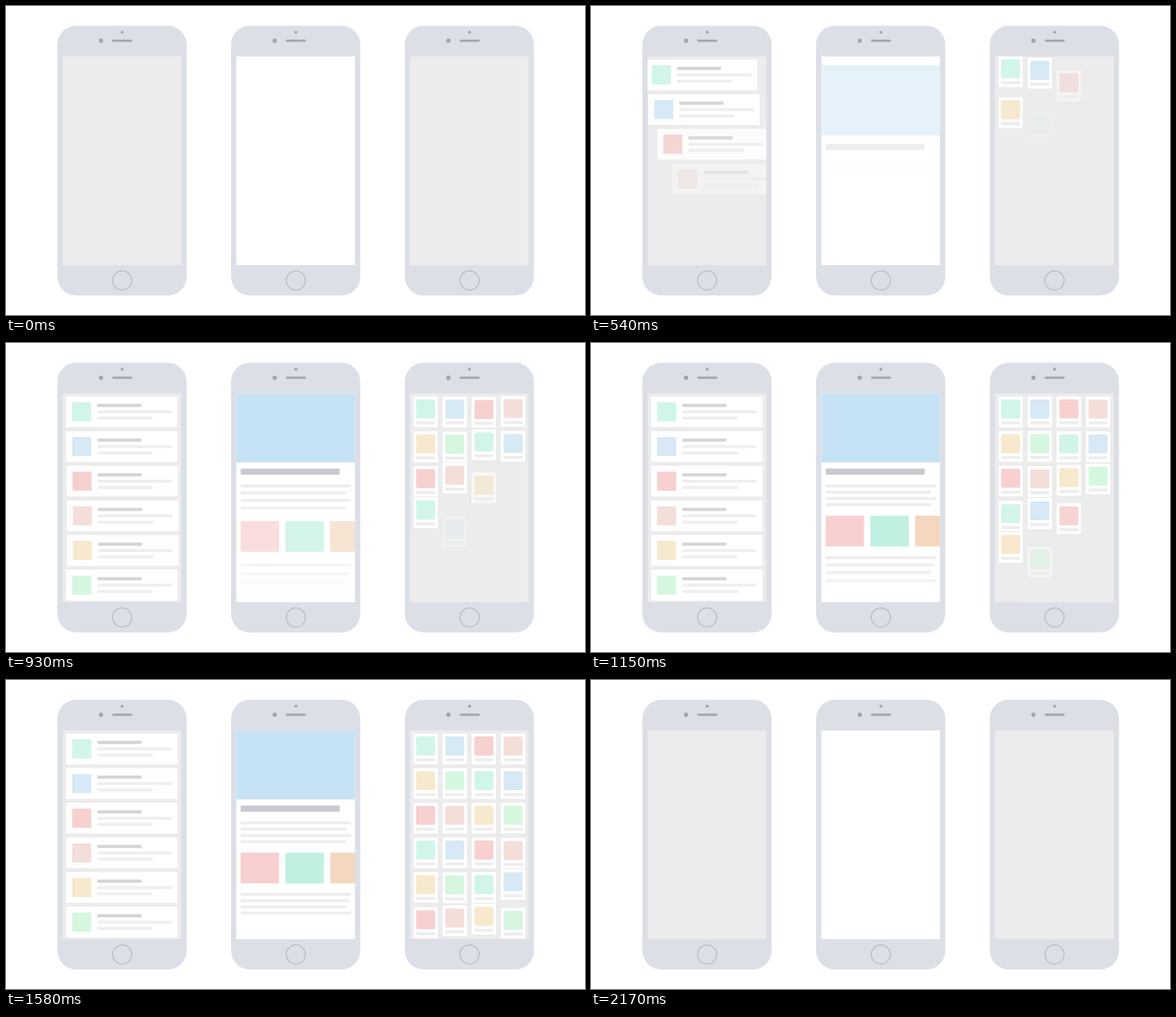
Animation of 800x427 px, one loop 2.21 s. Source, as an HTML page:

```html
<!DOCTYPE html>
<html>
<head>
<meta charset="utf-8">
<style>
  html, body { margin: 0; width: 100%; height: 100%; overflow: hidden; background: #fff; }
  body > svg { display: block; width: 800px; height: 427px; }
</style>
</head>
<body>
<script>
const LOOP = 2210, SHOW = 370, FADE = 1980, HIDE = 2170;
const COLORS = ['#d1f5e8', '#d6e9f5', '#f7d0cf', '#f4deda', '#f7e9cd', '#d6f7df'];

function add(parent, tag, attrs = {}) {
  const el = document.createElementNS('http://www.w3.org/2000/svg', tag);
  for (const key in attrs) el.setAttribute(key, attrs[key]);
  parent.append(el);
  return el;
}

function rect(parent, x, y, width, height, fill, rx = 0) {
  return add(parent, 'rect', { x, y, width, height, fill, rx });
}

const stage = add(document.body, 'svg', { viewBox: '0 0 800 427' });

// Draws a phone and returns the clipped group for its screen content.
function phone(x, screen) {
  const body = add(stage, 'g', { transform: `translate(${x})` });
  rect(body, 71, 27.3, 178.5, 372.7, '#dcdfe6', 26);
  add(body, 'circle', { cx: 160.5, cy: 36.3, r: 2, fill: '#a1a4ab' });
  add(body, 'circle', { cx: 131.3, cy: 48, r: 2.9, fill: '#a1a4ab' });
  rect(body, 146.7, 46.6, 27.8, 2.9, '#a1a4ab', 1.4);
  add(body, 'circle', { cx: 160.5, cy: 379.3, r: 13.2, fill: 'none', stroke: '#b5b8c2', 'stroke-width': 1.3 });
  rect(body, 78.2, 69.7, 164, 288.4, screen);
  const view = add(body, 'svg', { x: 78.2, y: 69.7, width: 164, height: 288.4, viewBox: '78.2 69.7 164 288.4' });
  return add(view, 'g');
}

const screens = [phone(0, '#ececec'), phone(240, '#fff'), phone(480, '#ececec')];
const items = [];

// Each item slides in from (dx, dy) while it fades in.
function item(screen, start, curve, dx, dy) {
  const el = add(screens[screen], 'g');
  items.push({ el, start, curve, dx, dy });
  return el;
}

function card(el, x, y, width) {
  rect(el, x, y, width, 43.7, '#fff').setAttribute('stroke', '#e5e5e5');
  el.lastChild.setAttribute('stroke-width', 0.7);
}

// Remaining share of the way at a given age in ms.
function spring(age) {
  if (age <= 0) return 1;
  const decay = 0.0087, speed = 0.015;
  return Math.exp(-decay * age) * (Math.cos(speed * age) + decay / speed * Math.sin(speed * age));
}

function ease(age) {
  const u = Math.min(1, Math.max(0, age / 624)), p = 1.75;
  return (1 - u) ** p / (u ** p + (1 - u) ** p);
}

// List
for (let i = 0; i < 6; i++) {
  const el = item(0, 330 + 50 * i, spring, 46, 0), y = 73.3 + 47.9 * i;
  card(el, 82.6, y, 155.2);
  rect(el, 91.4, y + 8.7, 26.4, 26.4, COLORS[i], 0.8);
  rect(el, 126.2, y + 10.8, 61, 4.5, '#d4d5d7', 1);
  rect(el, 126.2, y + 19.8, 103, 4.2, '#efefef', 1);
  rect(el, 126.2, y + 28.5, 76.5, 4.2, '#efefef', 1);
}

// Article
let count = 0;
const block = () => item(1, 245 + 50 * count++, ease, 0, 25);
const line = (y, width) => rect(block(), 84.3, y, width, 4.2, '#eeeeee', 1);

rect(block(), 78.2, 68, 164, 97, '#c6e3f5');
rect(block(), 84.3, 173.6, 136.7, 8.4, '#c8cacd', 1);
[152.5, 145.5, 152.5, 145.5].forEach((w, i) => line(195.3 + 8.7 * i, w));
const thumbs = block();
['#f7d0cf', '#bff0e2', '#f4d7bf'].forEach((c, i) => rect(thumbs, 84.3 + 61.8 * i, 238.6, 53, 42.4, c));
[152.5, 150, 145.5, 152.5].forEach((w, i) => line(294 + 8.7 * i, w));

// Grid, revealed in order of distance from the top left corner
const cells = [...Array(24).keys()].map(i => ({ i, col: i % 4, row: i >> 2 }));
const distance = c => c.col * 40.3 + c.row * 47.9;
const order = [...cells].sort((a, b) => distance(a) - distance(b));
for (const c of cells) {
  const k = order.indexOf(c);
  const el = item(2, 340 + 42.5 * k + 0.25 * k * k, spring, 0, 28);
  const x = 82.3 + 40.3 * c.col, y = 73.3 + 47.9 * c.row;
  card(el, x, y, 34.8);
  rect(el, x + 4.3, y + 4.8, 26.3, 26.3, COLORS[c.i % 6], 2.8);
  rect(el, x + 4.3, y + 35, 26.3, 4.2, '#eeeeee', 0.8);
}

function draw(now) {
  const t = now % LOOP;
  const shown = t < SHOW ? 0 : Math.min(1, Math.max(0, (HIDE - t) / (HIDE - FADE)));
  screens.forEach(s => s.setAttribute('opacity', shown));
  for (const { el, start, curve, dx, dy } of items) {
    const rest = curve(t - start);
    el.setAttribute('transform', `translate(${dx * rest} ${dy * rest})`);
    el.setAttribute('opacity', Math.min(1, 1 - rest));
  }
}

const begin = performance.now();
function tick() {
  draw(performance.now() - begin);
  requestAnimationFrame(tick);
}
tick();
</script>
</body>
</html>
```
